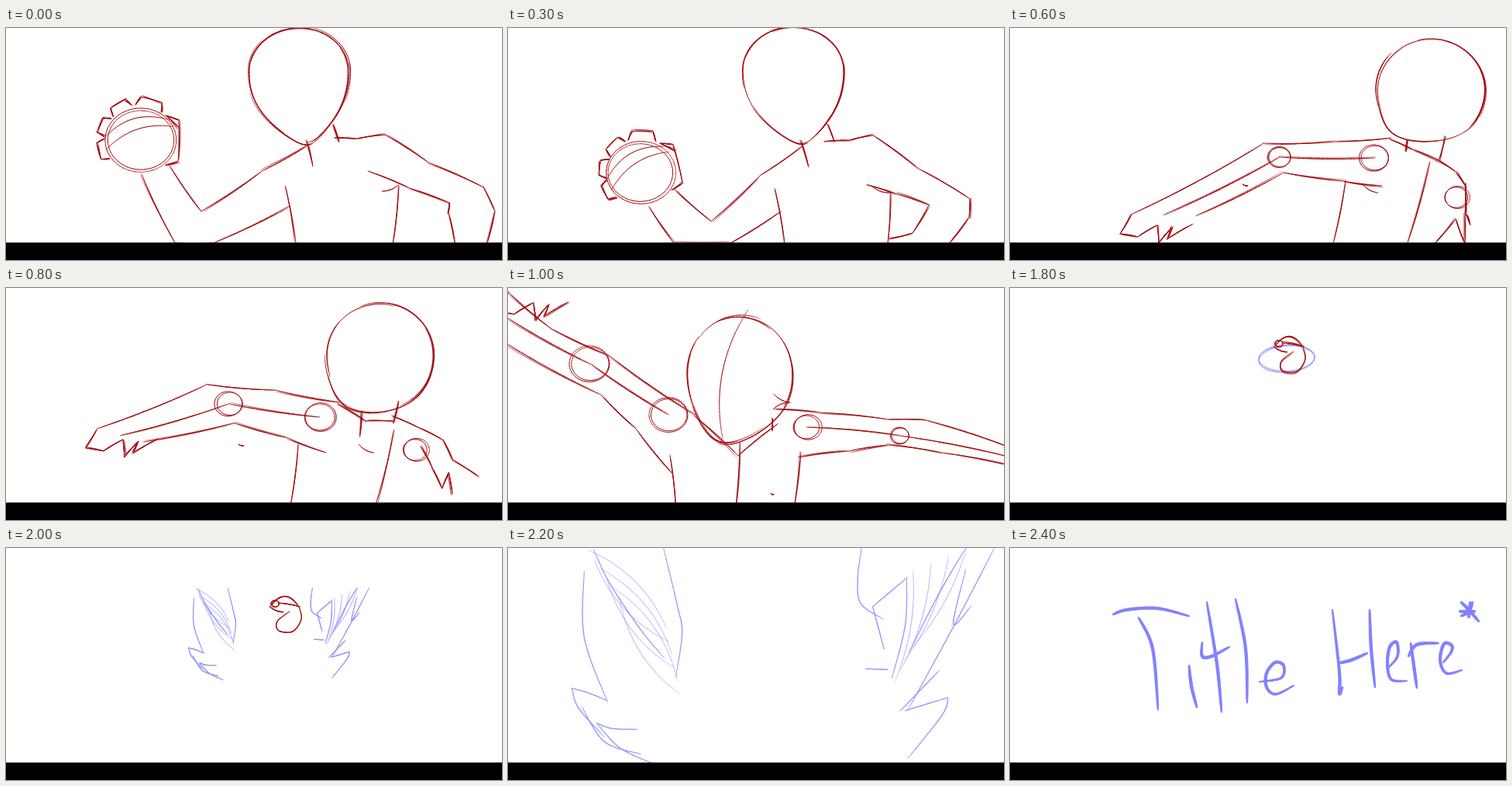
An HTML page with a canvas that plays this animation: 640x300 px, repeating every 7.7 s.

```html
<!DOCTYPE html>
<html lang="en">
<head>
<meta charset="utf-8">
<title>Throw sketch</title>
<style>
html, body { margin: 0; width: 100%; height: 100%; overflow: hidden; background: #fff; }
canvas { display: block; width: 640px; height: 300px; }
</style>
</head>
<body>
<canvas id="stage" width="640" height="300" role="img" aria-label="Title Here*"></canvas>
<script>
const ctx = document.getElementById('stage').getContext('2d');
const RED = '#a30d12', BLUE = '#9895fa', INK = '#8482ff';
const LOOP = 7700, STEP = 100, N = 36;

// Each pose is a small rig: head = x y width up down taper lean, joints = x y r,
// ball = x y r turn; every other part is a chain of points.
const poses = [
  { at: 0, head: '378 56 65 57 94 .4 10',
    inner: '389 152 330 185 252 237 211 178', outer: '366 230 268 278 218 278 175 189',
    top: '489 138 545 174 616 206 631 237 621 278', under: '467 185 520 207 572 226 571 240 579 278',
    sideL: '360 204 374 278', sideR: '507 203 499 278', neck: '387 145 396 179', nape: '422 124 430 147',
    collar: '424 142 452 143 490 138',
    joints: '390 180 0 260 250 0 480 160 0 590 220 0', ball: '173 145 46 0', marks: '485 211 506 203' },
  { at: 3, head: '369 56 65 57 94 .4 10',
    inner: '381 152 326 190 262 250 215 208', outer: '352 237 287 278 214 278 182 231',
    top: '470 138 530 182 596 221 595 245 570 278', under: '463 203 500 214 543 229 522 265 492 273',
    sideL: '344 208 357 278', sideR: '494 213 490 278', neck: '378 145 388 180', nape: '412 124 421 147',
    collar: '408 147 440 145 470 139',
    joints: '400 180 0 270 250 0 480 160 0 580 220 0', ball: '172 187 45 -.25', marks: '470 205 495 213' },
  { at: 6, head: '543 80 70 66 67 -.3 -8',
    inner: '492 142 420 147 327 149 157 241', outer: '480 204 430 198 353 187 240 243',
    top: '550 169 575 186 588 205 588 240 594 255', under: '588 200 587 240 587 278 575 247 548 278',
    sideL: '433 197 417 278', sideR: '542 173 513 278', neck: '513 145 511 160', nape: '562 140 553 172',
    collar: '490 144 520 157 553 171',
    joints: '471 168 19 348 167 15 576 219 16 590 260 0', ball: '150 265 0 0',
    marks: '455 202 475 213 300 202 307 204' },
  { at: 10, head: '300 112 68 75 89 .2 -18',
    inner: '242 164 130 87 55 52 0 5', outer: '212 240 165 182 120 138 -10 67',
    top: '345 157 400 161 490 170 540 171 660 211', under: '375 219 440 211 490 203 560 213 660 233',
    sideL: '209 217 217 290', sideR: '378 212 368 290', neck: '299 200 293 290', nape: '341 168 341 185',
    collar: '240 165 297 217 348 176',
    joints: '207 164 25 106 98 26 386 180 18 505 191 12', ball: '0 40 0 0',
    marks: '310 28 277 195 343 137 364 148 364 148 342 157 339 266 343 267' }
].map(p => {
  const rig = { at: p.at };
  for (const key in p) if (key !== 'at') rig[key] = p[key].split(' ').map(Number);
  return rig;
});

const flames = `99 30 99 115 129 199/111 2 132 46 172 106 202 142/201 0 219 75 225 110 217 166
  /129 197 104 187 83 181/83 181 92 207 125 244/96 205 125 250 172 266/115 226 145 258 187 278/115 226 135 233 167 234
  /456 0 451 40 455 72 484 92/470 75 485 131/515 38 470 76/514 40 512 100 495 168
  /627 0 575 100 515 210/590 0 555 60 517 135/590 28 574 98 597 75/556 158 505 211
  /512 210 567 193/567 193 560 215 515 272/461 156 490 157`;

const letters = `133 86 150 80 190 78 231 88/166 90 184 130 191 209/231 152 234 178 241 206
  /254 70 267 150 273 212/248 122 248 140 260 140 283 128/291 66 304 130 306 200
  /322 173 350 168 353 152 342 148 331 162 331 180 343 189 366 178
  /416 80 425 160 425 188 429 180/464 80 466 130 471 180/423 149 440 145 461 136
  /489 154 500 140 499 122 490 128 487 150 492 170 512 172/517 123 525 181/514 140 525 125 553 123
  /559 148 569 135 570 126 560 124 555 145 563 162 583 158
  /582 70 592 80 605 95/597 70 592 82 582 88/580 82 600 82/594 70 592 90`;

let seed = 1;
const rand = () => {
  seed = (seed * 16807) % 2147483647;
  return seed / 2147483647;
};
const jitter = size => (rand() * 2 - 1) * size;
const curve = f => Array.from({ length: N + 1 }, (_, i) => f(i / N));
const lerp = (a, b, k) => a + (b - a) * k;
const pairs = n => Array.from({ length: n.length / 2 }, (_, i) => [n[2 * i], n[2 * i + 1]]);
const parse = text => text.split('/').map(s => spline(pairs(s.trim().split(/\s+/).map(Number))));

function spline(p) {
  const last = p.length - 1;
  const at = i => p[Math.max(0, Math.min(last, i))];
  return curve(s => {
    const i = Math.min(last - 1, Math.floor(s * last)), t = s * last - i;
    return [0, 1].map(k => {
      const [a, b, c, d] = [-1, 0, 1, 2].map(j => at(i + j)[k]);
      return b + t * (c - a + t * (2 * a - 5 * b + 4 * c - d + t * (3 * b - a - 3 * c + d))) / 2;
    });
  });
}

// A bowed line; bow is the bulge as a share of the length.
function arc([ax, ay], [bx, by], bow = 0) {
  return curve(t => {
    const h = 4 * t * (1 - t) * bow;
    return [lerp(ax, bx, t) + (by - ay) * h, lerp(ay, by, t) - (bx - ax) * h];
  });
}

function stroke(pts, color, width, nib = .5) {
  ctx.strokeStyle = color;
  for (let i = 1; i < pts.length; i++) {
    ctx.lineWidth = width * lerp(nib, 1, Math.sqrt(Math.sin(Math.PI * (i - .5) / N)));
    ctx.beginPath();
    ctx.moveTo(...pts[i - 1]);
    ctx.lineTo(...pts[i]);
    ctx.stroke();
  }
}

// One firm pass and a looser, thinner one beside it.
function sketch(pts, width = 1.3, loose = 2) {
  stroke(pts, RED, width);
  const [ax, ay, bx, by] = Array.from({ length: 4 }, () => jitter(loose));
  stroke(pts.map(([x, y], i) => [x + lerp(ax, bx, i / N), y + lerp(ay, by, i / N)]), RED, width * .6, .2);
}

function chain(points) {
  for (let i = 1; i < points.length; i++) sketch(arc(points[i - 1], points[i], .015));
}

function ovals(x, y, r) {
  for (const size of [1, .93]) {
    const rx = r * size, ry = r * (size - .1), turn = rand() * 6, dx = jitter(1.5);
    stroke(curve(t => [x + dx + rx * Math.cos(t * 6.4 + turn), y + ry * Math.sin(t * 6.4 + turn)]), RED, 1);
  }
}

// An egg built from overlapping arcs.
function head([x, y, w, up, down, taper, lean]) {
  for (let i = 0; i < 9; i++) {
    const from = i * .72 + jitter(.2), span = 1.1 + rand() * .9, a = jitter(2), b = jitter(2.5);
    stroke(curve(t => {
      const s = Math.sin(from + span * t), c = Math.cos(from + span * t);
      const low = Math.max(0, s) ** 3, off = lerp(a, b, t);
      return [x + c * (w + off) * (1 - taper * low) + lean * low, y + s * ((s < 0 ? up : down) + off)];
    }), RED, i % 2 ? 1 : 1.5, .2);
  }
}

function ball(x, y, r, turn, held) {
  const rim = (a, size = 1) => [x + size * r * Math.cos(a + turn), y + size * r * Math.sin(a + turn)];
  ovals(x, y, r);
  stroke(arc(rim(-3.08), rim(-.6), .16), RED, 1);
  stroke(arc(rim(2.86), rim(-.39), .13), RED, 1);
  if (!held) return;
  // Fingers are boxy bumps on the rim, the thumb is the widest.
  for (const [a, b] of [[-1.7, -.9], [-2.42, -1.8], [-3.05, -2.5], [-3.7, -3.1], [-.75, .78]]) {
    const d = (b - a) * .18;
    chain([rim(a), rim(a + d, 1.22), rim(b - d, 1.22), rim(b)]);
  }
  chain([rim(-.75), rim(-.3, 1.15)]);
}

function openHand([x, y]) {
  const zigzag = [[0, 0], [-15, 25], [8, 29], [33, 14], [35, 37], [53, 16], [46, 32], [78, 13]];
  chain(zigzag.map(([dx, dy]) => [x + dx, y + dy]));
}

function figure(a, b, k) {
  const rig = {};
  for (const key of Object.keys(a)) {
    if (key !== 'at' && key !== 'marks') rig[key] = a[key].map((v, i) => lerp(v, b[key][i], k));
  }
  const path = key => pairs(rig[key]);
  head(rig.head);
  for (const key of ['inner', 'outer', 'top', 'under', 'sideL', 'sideR', 'neck', 'nape', 'collar']) chain(path(key));

  const spots = [0, 3, 6, 9].map(i => rig.joints.slice(i, i + 3));
  const middle = (p, q) => p.map((v, i) => (v + q[i]) / 2);
  const bones = (shoulder, elbow, p, q) => {
    if (elbow[2] > 8) chain([shoulder, elbow, middle(p.at(-1), q.at(-1))].map(s => s.slice(0, 2)));
  };
  for (const s of spots) if (s[2] > 8) ovals(...s);
  bones(spots[0], spots[1], path('inner'), path('outer'));
  bones(spots[2], spots[3], path('top'), path('under'));

  const near = k < .5 ? a : b, marks = pairs(near.marks);
  for (let i = 0; i < marks.length; i += 2) stroke(arc(marks[i], marks[i + 1], -.1), RED, 1);
  if (near.ball[2]) ball(...(b.ball[2] ? rig.ball : near.ball), true);
  else openHand(rig.inner.slice(-2));
}

function openBall() {
  sketch(arc([342, 75], [378, 76], .36), 1.4, 1.5);
  sketch(arc([351, 71], [379, 76], .03), 1.3, 2);
  sketch(arc([340, 75], [358, 83], -.1), 1.2, 1);
  sketch(spline([[378, 76], [381, 92], [370, 108], [352, 107], [350, 95], [366, 82]]), 1.4, 2);
  ovals(348, 72, 5);
}

function ring() {
  for (let i = 0; i < 3; i++) {
    const turn = jitter(.1), dy = jitter(1.5);
    stroke(curve(t => [
      357 + 36 * Math.cos(t * 6.4 + i) - 17 * turn * Math.sin(t * 6.4 + i),
      91 + dy + 17 * Math.sin(t * 6.4 + i) + 36 * turn * Math.cos(t * 6.4 + i)
    ]), BLUE, 1);
  }
}

const contours = parse(flames), title = parse(letters);
const streaks = [];
for (let i = 0; i < 6; i++) streaks.push(arc([104 + 8 * i, 3 + 12 * i], [205 + 3.5 * i, 104 + 17 * i], i % 2 ? -.1 : .1));
for (let i = 0; i < 4; i++) streaks.push(arc([522 + 23 * i, 30 - 10 * i], [499 + 6 * i, 172 - 13 * i], .06));

function burst(size) {
  const grow = pts => pts.map(([x, y]) => [350 + (x - 350) * size, 90 + (y - 90) * size]);
  for (const s of contours) stroke(grow(s), BLUE, 1.3);
  for (const s of streaks) stroke(grow(s), BLUE, .7);
}

function paint(step) {
  seed = 7919 + step * 131;
  ctx.fillStyle = '#fff';
  ctx.fillRect(0, 0, 640, 300);
  ctx.lineCap = 'round';
  if (step <= 13) {
    const i = step < 3 ? 0 : step < 6 ? 1 : 2, a = poses[i], b = poses[i + 1];
    const k = Math.min(1, (step - a.at) / (b.at - a.at));
    ctx.save();
    ctx.translate(300, 300);
    ctx.rotate(-.04 * Math.max(0, step - 10));
    ctx.translate(-300, -300);
    figure(a, b, i === 2 ? k * k : k);
    ctx.restore();
  } else if (step <= 17) {
    const k = (step - 14) / 3;
    ball(lerp(300, 360, k), lerp(120, 87, k), lerp(42, 19, k), step * .8);
  } else if (step <= 23) {
    if (step === 18) ring();
    else burst(.28 * 1.53 ** (step - 19));
    if (step <= 20) openBall();
  } else {
    for (const s of title) stroke(s, INK, 4.2, .4);
  }
  ctx.fillStyle = '#000';
  ctx.fillRect(0, 277.4, 640, 23);
}

const start = performance.now();
let shown = -1;
function tick() {
  const t = (performance.now() - start) % LOOP;
  const step = Math.min(24, Math.floor(t / STEP));
  if (step !== shown) paint(shown = step);
  requestAnimationFrame(tick);
}
tick();
</script>
</body>
</html>
```
